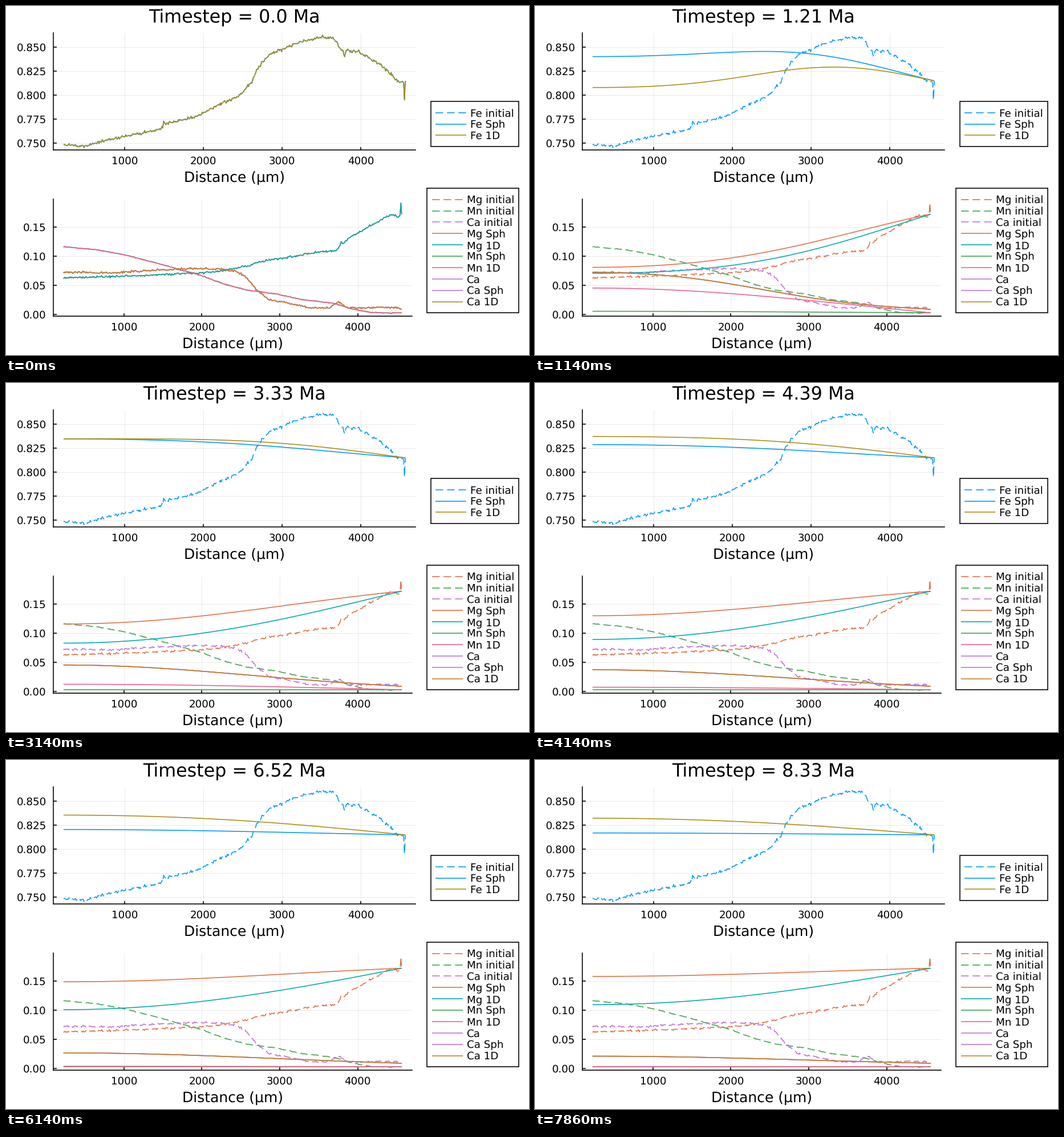
A matplotlib script that plays this animation: 917x611 px, repeating every 8 s.

```python
import numpy as np
import matplotlib.pyplot as plt
from matplotlib.animation import FuncAnimation
from matplotlib.patches import Rectangle

W, H, DPI = 917, 611, 64
PX = 72 / DPI                       # points per pixel
LOOP, TICK = 8000, 50               # ms
STATES = 56                         # time steps shown in one loop
STEP = 10 / 66                      # Ma per time step
LINE = 1.6 * PX
SMALL, MEDIUM, LARGE = 18.2, 25, 31.8
DASH = (0, (8.4, 4.2))

BLUE, ORANGE, GREEN, PURPLE = "#009AFA", "#E26F46", "#3DA44D", "#C271D2"
OLIVE, TEAL, PINK, BROWN = "#AC8D18", "#00AAAE", "#ED5E93", "#C68225"

plt.rcParams["font.family"] = "DejaVu Sans"
plt.rcParams["text.hinting"] = "none"
plt.rcParams["lines.solid_capstyle"] = "butt"

fig = plt.figure(figsize=(W / DPI, H / DPI), dpi=DPI, facecolor="white")
page = fig.add_axes([0, 0, 1, 1], zorder=5)
page.set(xlim=(0, W), ylim=(H, 0))
page.axis("off")


def write(x, y, text, size, ha="center"):
    return page.text(x, y, text, fontsize=size * PX, ha=ha, va="baseline")


X_MIN, X_MAX = 223, 4564.6          # profile ends in micrometres
PAD = 0.03 * (X_MAX - X_MIN)


def panel(left, top, right, bottom, ylim, yticks, fmt):
    ax = fig.add_axes([left / W, 1 - bottom / H, (right - left) / W, (bottom - top) / H])
    xlim = (X_MIN - PAD, X_MAX + PAD)
    xticks = range(1000, 5000, 1000)
    ax.set(xlim=xlim, ylim=ylim, xticks=xticks, yticks=yticks)
    ax.spines[["top", "right"]].set_visible(False)
    ax.spines[["left", "bottom"]].set_linewidth(LINE)
    ax.tick_params(direction="in", length=5.5 * PX, width=LINE,
                   labelbottom=False, labelleft=False)
    ax.grid(color="black", alpha=0.1, linewidth=0.8 * PX)
    ax.set_axisbelow(True)
    for v in xticks:
        write(np.interp(v, xlim, (left, right)), bottom + 24.5, str(v), SMALL)
    for v in yticks:
        write(70.7, np.interp(v, ylim, (bottom, top)) + 6.6, fmt % v, SMALL, "right")
    write((left + right) / 2, bottom + 55.5, "Distance (µm)", MEDIUM)
    return ax


def legend(left, top, right, bottom, entries):
    page.add_patch(Rectangle((left, top), right - left, bottom - top,
                             facecolor="white", edgecolor="black", linewidth=LINE))
    for i, (name, color, style) in enumerate(entries):
        y = top + 19.7 + 19.87 * i
        page.plot([left + 8.7, left + 62.7], [y, y], color=color, linestyle=style,
                  linewidth=LINE)
        write(left + 70, y + 6.6, name, SMALL, "left")


upper = panel(83, 47, 718, 252.3, (0.7428, 0.8652), np.arange(0.75, 0.86, 0.025), "%.3f")
lower = panel(83, 338, 711.5, 543.3, (-0.00294, 0.1985), np.arange(0, 0.16, 0.05), "%.2f")

fe_series = [("Fe initial", BLUE, DASH), ("Fe Sph", BLUE, "-"), ("Fe 1D", OLIVE, "-")]
minor_series = [
    ("Mg initial", ORANGE, DASH), ("Mn initial", GREEN, DASH), ("Ca initial", PURPLE, DASH),
    ("Mg Sph", ORANGE, "-"), ("Mg 1D", TEAL, "-"), ("Mn Sph", GREEN, "-"),
    ("Mn 1D", PINK, "-"), ("Ca", PURPLE, "-"), ("Ca Sph", PURPLE, "-"),
    ("Ca 1D", BROWN, "-"),
]
legend(744.5, 167, 899, 245.5, fe_series)
legend(738, 319, 899, 536.5, minor_series)


def bump(x, centre, width, height):
    return height * np.maximum(0, 1 - np.abs(x - centre) / width)


def trend(x, *knots):
    return np.interp(x, *zip(*knots))


# Measured profiles: a piecewise trend plus a few local bumps.
def fe_profile(x):
    return (trend(x, (223, 0.7485), (500, 0.7475), (868, 0.755), (1420, 0.764),
                  (1530, 0.7705), (1905, 0.778), (2463, 0.8005), (2615, 0.814),
                  (2702, 0.831), (2861, 0.8437), (3260, 0.8563), (3514, 0.861),
                  (3666, 0.8587), (3753, 0.847), (3960, 0.846), (4253, 0.832),
                  (4480, 0.814), (4565, 0.815))
            + bump(x, 1499, 15, 0.006) + bump(x, 3793, 20, -0.007)
            + bump(x, 4554, 10, -0.021))


def mg_profile(x):
    return (trend(x, (223, 0.0633), (1169, 0.067), (2158, 0.0729), (2597, 0.0837),
                  (2707, 0.0898), (3512, 0.1077), (3710, 0.1097), (3878, 0.1308),
                  (4376, 0.169), (4450, 0.1715), (4523, 0.167), (4565, 0.1725))
            + bump(x, 3790, 20, 0.006) + bump(x, 4554, 10, 0.022))


def mn_profile(x):
    return trend(x, (223, 0.1166), (657, 0.1112), (986, 0.1033), (1389, 0.0896),
                 (1975, 0.068), (2268, 0.0533), (2560, 0.0425), (2926, 0.0361),
                 (3293, 0.0258), (3695, 0.0194), (3915, 0.0101), (4171, 0.0037),
                 (4391, 0.0026), (4565, 0.0032))


def ca_profile(x):
    return (trend(x, (223, 0.0729), (876, 0.0718), (1389, 0.0763), (1901, 0.0793),
                  (2231, 0.0778), (2436, 0.0744), (2560, 0.0651), (2707, 0.0425),
                  (2853, 0.0258), (3110, 0.0199), (3403, 0.0116), (3681, 0.0116),
                  (4500, 0.0125), (4565, 0.0092))
            + bump(x, 3754, 110, 0.011))


CELLS = 100
x_raw = np.linspace(X_MIN, X_MAX, 435)
x_sim = np.linspace(X_MIN, X_MAX, CELLS + 1)
rng = np.random.default_rng(7)


def measured(profile, noise):
    jitter = noise * rng.standard_normal(len(x_raw))
    jitter[-2:] = 0
    return profile(x_raw) + jitter


fe_raw = measured(fe_profile, 0.0009)
mg_raw = measured(mg_profile, 0.0009)
mn_raw = measured(mn_profile, 0.0003)
ca_raw = measured(ca_profile, 0.0008)
start = np.array([p(x_sim) for p in (mg_profile, mn_profile, ca_profile)])


def tracer(d0, energy, volume, celsius=900, gpa=0.6):
    """Garnet tracer diffusivity in square micrometres per Ma."""
    heat = 8.3145 * (celsius + 273.15)
    return 3.156e21 * d0 * np.exp(-(energy + 1000 * gpa * volume) / heat)


D_FE = tracer(6.4e-4, 275408, 5.6)
D = np.array([tracer(1.1e-3, 284499, 5.3), tracer(5.1e-4, 253421, 6.0), D_FE / 2])


def diffuse(c, m, substeps=4, theta=0.6):
    """Coupled Mg-Mn-Ca diffusion; m = 0 is planar, m = 2 spherical."""
    h = (X_MAX - X_MIN) / CELLS
    face = (np.arange(CELLS) + 0.5) * h
    area = face ** m
    volume = np.diff(np.r_[0, face] ** (m + 1)) / (m + 1)
    grad = (np.eye(CELLS, CELLS + 1, 1) - np.eye(CELLS, CELLS + 1)) / h
    div = np.zeros((CELLS + 1, CELLS))          # last row stays 0: fixed rim
    div[:-1] = (np.diag(area) - np.diag(area[:-1], -1)) / volume[:, None]
    unit, excess = np.eye(c.size), D - D_FE
    dt = STEP / substeps
    states = [c]
    for _ in range(STATES - 1):
        for _ in range(substeps):
            mid = (c[:, 1:] + c[:, :-1]) / 2
            mean = D_FE + excess @ mid
            coef = D[:, None, None] * (np.eye(3)[:, :, None]
                                       - mid[:, None] * excess[None, :, None] / mean)
            op = np.block([[div @ (coef[i, j][:, None] * grad) for j in range(3)]
                           for i in range(3)])
            flat = c.ravel()
            change = np.linalg.solve(unit - theta * dt * op, dt * (op @ flat))
            c = (flat + change).reshape(c.shape)
        states.append(c)
    return states


sphere = diffuse(start, 2)
plane = diffuse(start, 0)


def add_lines(ax, series):
    return [ax.plot([], [], color=color, linestyle=style, linewidth=LINE)[0]
            for _, color, style in series]


fe_lines = add_lines(upper, fe_series)
minor_lines = add_lines(lower, minor_series)
fe_lines[0].set_data(x_raw, fe_raw)
for line, raw in zip(minor_lines, (mg_raw, mn_raw, ca_raw)):
    line.set_data(x_raw, raw)
title = write(400.8, 28, "", LARGE)


def draw(frame):
    n = int((frame + 0.9) * TICK * STATES / LOOP)
    title.set_text(f"Timestep = {round(n * STEP, 2)} Ma")
    if n == 0:
        x, fe = x_raw, (fe_raw, fe_raw)
        minor = (mg_raw, mg_raw, mn_raw, mn_raw, ca_raw, ca_raw, ca_raw)
    else:
        s, p = sphere[n], plane[n]
        x, fe = x_sim, (1 - s.sum(axis=0), 1 - p.sum(axis=0))
        minor = (s[0], p[0], s[1], p[1], s[2], s[2], s[2])
    for line, y in zip(fe_lines[1:] + minor_lines[3:], fe + minor):
        line.set_data(x, y)
    return [title, *fe_lines, *minor_lines]


anim = FuncAnimation(fig, draw, frames=LOOP // TICK, interval=TICK, repeat=True)
plt.show()
```
